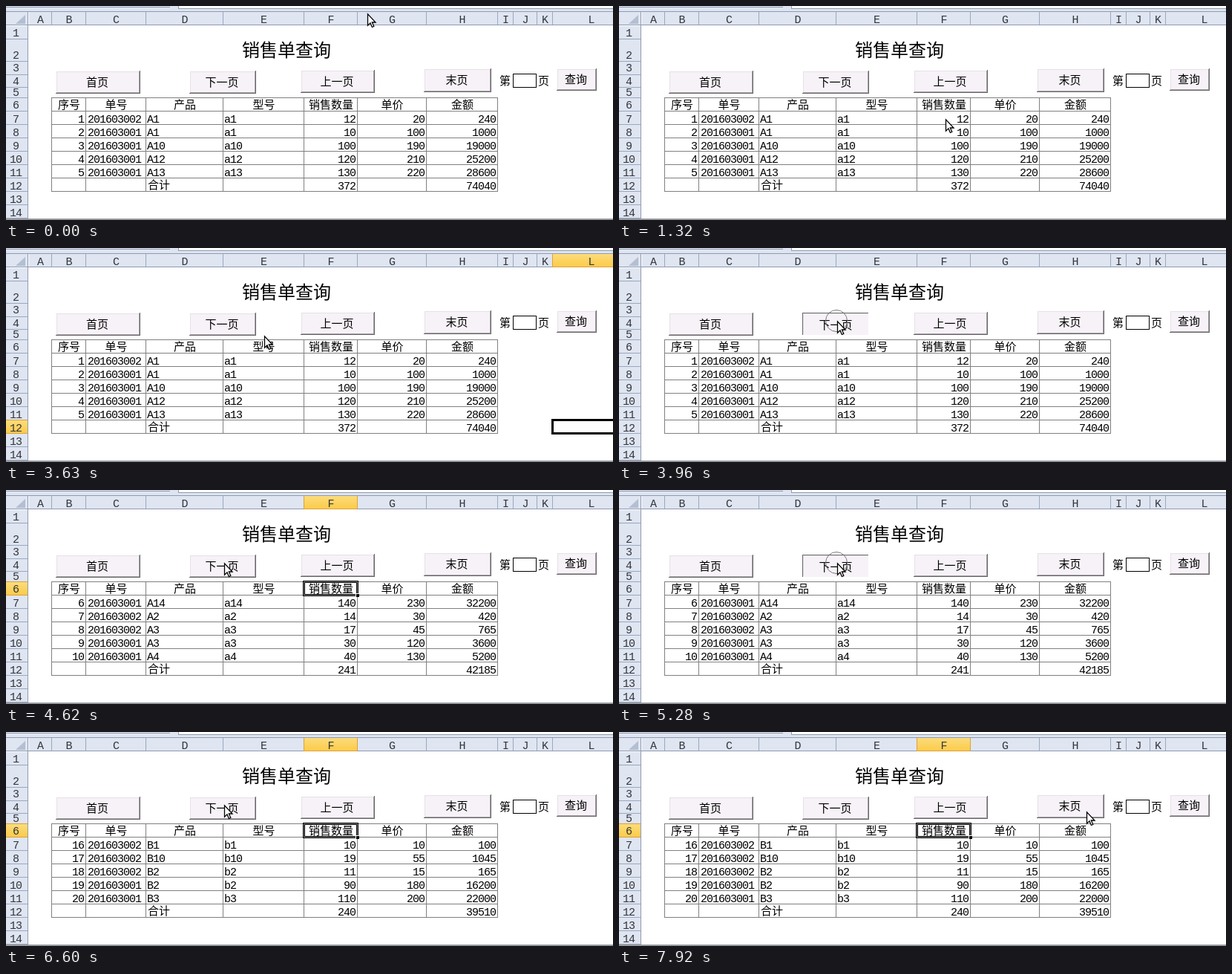
An HTML page that plays this animation: 818x288 px, repeating every 8 s.

```html
<!DOCTYPE html>
<html lang="zh">
<head>
<meta charset="utf-8">
<style>
html, body { margin: 0; width: 100%; height: 100%; overflow: hidden; background: #fff; }
svg { display: block; width: 818px; height: 288px; }
text { font: 300 15px "Noto Sans CJK SC", "Noto Sans CJK", sans-serif; fill: #000; }
.mono { font: 15px "Liberation Mono", monospace; letter-spacing: -1px; }
.title { font-size: 24px; }
.head { fill: #33363d; }
.mid { text-anchor: middle; }
.end { text-anchor: end; }
.line { shape-rendering: crispEdges; }
.anim { animation: 8s step-end infinite; }
#page1 { animation-name: page1; }
#page2 { animation-name: page2; }
#page3 { animation-name: page3; }
#page4 { animation-name: page4; }
#pickL { animation-name: pickL; }
#pickF { animation-name: pickF; }
#press { animation-name: press; }
#ring { animation-name: ring; }
#cursor { animation-name: move; }
@keyframes page1 { 0% { opacity: 1 } 57.75%, 100% { opacity: 0 } }
@keyframes page2 { 0% { opacity: 0 } 57.75% { opacity: 1 } 70.125%, 100% { opacity: 0 } }
@keyframes page3 { 0% { opacity: 0 } 70.125% { opacity: 1 } 82.5%, 100% { opacity: 0 } }
@keyframes page4 { 0% { opacity: 0 } 82.5%, 100% { opacity: 1 } }
@keyframes pickL { 0% { opacity: 0 } 33% { opacity: 1 } 49.5%, 100% { opacity: 0 } }
@keyframes pickF { 0% { opacity: 0 } 53.625% { opacity: 1 } 66% { opacity: 0 } 70.125%, 100% { opacity: 1 } }
@keyframes press {
  0%, 53.625%, 70.125%, 82.5%, 100% { opacity: 0 }
  49.5%, 66%, 78.375% { opacity: 1 }
}
@keyframes ring {
  0%, 37.125%, 53.625%, 70.125%, 82.5%, 100% { opacity: 0 }
  33%, 49.5%, 66%, 78.375% { opacity: 1 }
}
@keyframes move {
  0% { transform: translate(487px, 10px) }
  4.125% { transform: translate(637px, 227px) }
  8.25% { transform: translate(-50px, -50px) }
  12.375% { transform: translate(561px, 248px) }
  16.5% { transform: translate(440px, 152px) }
  20.625% { transform: translate(354px, 113px) }
  24.75% { transform: translate(548px, 122px) }
  28.875% { transform: translate(479px, 104px) }
  33% { transform: translate(472px, 103px) }
  41.25% { transform: translate(445px, 99px) }
  45.375% { transform: translate(348px, 118px) }
  49.5% { transform: translate(294px, 98px) }
  94.875% { transform: translate(652px, 119px) }
  99%, 100% { transform: translate(630px, 107px) }
}
</style>
</head>
<body>
<svg id="stage" viewBox="0 0 818 288">
  <defs>
    <linearGradient id="picked" x2="0" y2="1">
      <stop stop-color="#fbdc7d"/><stop offset="1" stop-color="#fccb48"/>
    </linearGradient>
  </defs>
</svg>
<script>
const colX = [30, 61, 107, 188, 292, 401, 473, 566, 662, 683, 715, 736, 840];
const rowY = [26, 44, 74, 92, 109, 123, 141, 159, 177, 195, 213, 231, 249, 267, 285];
const labelY = [36, 66, 83, 101, 116, 133, 152, 170, 188, 206, 224, 242, 260, 278];
const edge = '#9aa8bf', border = '#8f9bb0', face = '#dfe5f1', grid = '#808080';

// Each line: last digit of the order number, product, quantity, price
const pages = [
  '2 A1 12 20,1 A1 10 100,1 A10 100 190,1 A12 120 210,1 A13 130 220',
  '1 A14 140 230,2 A2 14 30,2 A3 17 45,1 A3 30 120,1 A4 40 130',
  '1 A5 50 140,1 A7 70 160,1 A8 80 170,1 B1 20 110,1 B1 60 150',
  '2 B1 10 10,2 B10 19 55,2 B2 11 15,1 B2 90 180,1 B3 110 200'
];

const rect = (x, y, w, h, fill) =>
  `<rect class="line" x="${x}" y="${y}" width="${w}" height="${h}" fill="${fill}"/>`;
const frame = (x, y, w, h, color, width = 1) =>
  `<rect class="line" x="${x + width / 2}" y="${y + width / 2}" width="${w - width}" height="${h - width}"
    fill="none" stroke="${color}" stroke-width="${width}"/>`;
const text = (x, y, s, cls = '') => `<text x="${x}" y="${y}" class="${cls}">${s}</text>`;
const group = (id, body) => `<g id="${id}" class="anim">${body}</g>`;

function colHead(i, picked) {
  const x = colX[i], w = colX[i + 1] - x;
  return rect(x + 1, 8, w - 1, 17, picked ? 'url(#picked)' : face) +
    rect(x + w, 8, 1, 17, picked ? '#dda13b' : edge) +
    (picked ? rect(x, 8, 1, 17, '#dda13b') + rect(x, 25, w, 1, '#dda13b') : '') +
    text(x + w / 2 + .5, 23, 'ABCDEFGHIJKL'[i], 'mono head mid');
}

function rowHead(i, picked) {
  const y = rowY[i], h = rowY[i + 1] - y;
  return rect(0, y + 1, 29, h - 1, picked ? 'url(#picked)' : face) +
    rect(0, y + h, 29, 1, picked ? '#dda13b' : edge) +
    (picked ? rect(0, y, 29, 1, '#dda13b') : '') +
    text(13, labelY[i] + 5, i + 1, 'mono head mid');
}

function button(x, y, w, h, label, down) {
  const [light, dark, inner] = down ? ['#696969', '#fff', '#f7f2f7'] : ['#fff', '#686668', '#a5a1a5'];
  const shift = down ? 1 : 0;
  return rect(x, y, w, h, '#f7f2f7') +
    rect(x, y, w, 1, light) + rect(x, y, 1, h, light) +
    rect(x + 1, y + 1, w - 2, 1, '#e5e1e5') + rect(x + 1, y + 1, 1, h - 2, '#e5e1e5') +
    rect(x + 1, y + h - 2, w - 2, 1, inner) + rect(x + w - 2, y + 1, 1, h - 2, inner) +
    rect(x, y + h - 1, w, 1, dark) + rect(x + w - 1, y, 1, h, dark) +
    text(x + w / 2 - 1 + shift, y + h / 2 + 5 + shift, label, 'mid');
}

function pageRows(source, page) {
  let quantity = 0, total = 0;
  const rows = source.split(',').map((line, i) => {
    const [order, product, qty, price] = line.split(' ');
    const y = 157 + i * 18;
    quantity += +qty;
    total += qty * price;
    return text(105, y, page * 5 + i + 1, 'mono end') +
      text(110, y, '20160300' + order, 'mono') +
      text(190, y, product, 'mono') + text(294, y, product.toLowerCase(), 'mono') +
      text(471, y, qty, 'mono end') + text(564, y, price, 'mono end') +
      text(660, y, qty * price, 'mono end');
  });
  return group('page' + (page + 1), rows.join('') +
    text(471, 247, quantity, 'mono end') + text(660, 247, total, 'mono end'));
}

function sheet() {
  let out = rect(0, 0, 818, 8, '#dfe5f0') + rect(0, 1, 221, 1, border) +
    rect(233, 0, 585, 3, '#fff') + rect(232, 0, 1, 4, border) + rect(232, 3, 586, 1, border) +
    rect(0, 7, 818, 1, border) + rect(0, 8, 30, 18, face) +
    '<path d="M26 12V24H13Z" fill="#b3bfd2"/>';
  for (let i = 0; i < 12; i++) out += colHead(i);
  for (let i = 0; i < 14; i++) out += rowHead(i);
  out += rect(0, 25, 818, 1, border) + rect(29, 8, 1, 278, border) + rect(0, 286, 818, 2, '#96999e');
  for (const x of colX.slice(1, 9)) out += rect(x, 123, 1, 127, grid);
  for (const y of rowY.slice(5, 13)) out += rect(61, y, 602, 1, grid);
  '序号 单号 产品 型号 销售数量 单价 金额'.split(' ').forEach((s, i) => {
    out += text((colX[i + 1] + colX[i + 2]) / 2 + 1, 138, s, 'mid');
  });
  return out + text(191, 246, '合计') + text(378, 68, '销售单查询', 'title mid') +
    text(665, 106, '第') + text(717, 106, '页') + frame(683, 91, 32, 19, '#000');
}

const buttons = button(67, 87, 114, 31, '首页') + button(247, 87, 90, 31, '下一页') +
  button(397, 86, 100, 31, '上一页') + button(563, 84, 91, 32, '末页') + button(742, 84, 54, 30, '查询');

const pickL = colHead(11, true) + rowHead(11, true) + frame(735, 230, 106, 21, '#000', 3);
const pickF = colHead(5, true) + rowHead(5, true) +
  frame(400, 122, 75, 21, '#000') + frame(401, 123, 73, 19, '#7f7f7f') + frame(402, 124, 71, 17, '#000') +
  rect(471, 139, 5, 5, '#fff') + rect(472, 140, 4, 4, '#000');

const cursor = '<circle id="ring" class="anim" cx="-1" r="14.5" fill="none" stroke="#777"/>' +
  '<path d="M.5 .8V16.2L4 12.9L6.4 18.5L8.8 17.5L6.4 12H11Z" fill="#fff" stroke="#000" stroke-width="1.3"/>';

document.getElementById('stage').innerHTML += sheet() + buttons +
  group('press', button(247, 87, 90, 31, '下一页', true)) +
  pages.map(pageRows).join('') + group('pickL', pickL) + group('pickF', pickF) + group('cursor', cursor);
</script>
</body>
</html>
```
